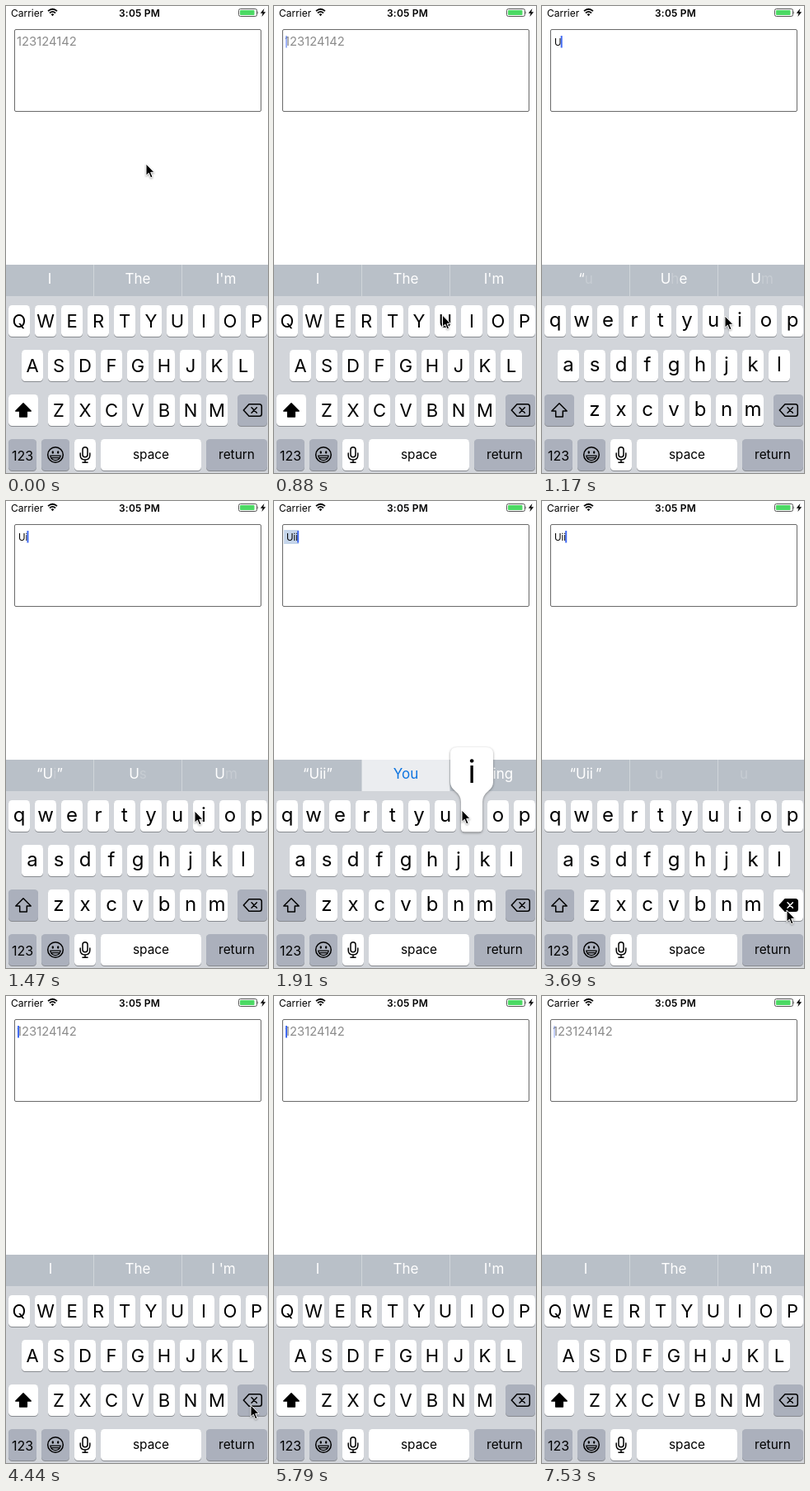
An HTML page that plays this animation: 318 px wide and 565 px high, repeating every 7630 ms.

```html
<!DOCTYPE html>
<html lang="en">
<head>
<meta charset="utf-8">
<title>Text view with keyboard</title>
<style>
  html, body { margin: 0; width: 100%; height: 100%; overflow: hidden; background: #fff; }
  svg { display: block; width: 318px; height: 565px; font-family: Inter, Roboto, "Liberation Sans", sans-serif; }
  text { white-space: pre; }
  .mid { text-anchor: middle; }
  .line { fill: none; stroke: #000; stroke-width: 1.5; stroke-linecap: round; stroke-linejoin: round; }
</style>
</head>
<body>
<svg id="stage" viewBox="0 0 318 565" xmlns="http://www.w3.org/2000/svg"></svg>
<script>
const LOOP = 7630;
const GRAY = '#abb0bc';
const stage = document.getElementById('stage');

// Picture steps: about 147 ms apart at first, then 150 ms
const late = { 48: 7130, 49: 7280, 50: 7430, 51: 7530 };
const times = Array.from({ length: 52 }, (_, i) =>
  late[i] || (i <= 17 ? Math.floor(i * 14.7) * 10 : 2490 + 150 * (i - 17)));

// [step, typed letters, pressed key, three suggestions]; {x} is faint, * is chosen, @ sets the centre
const typing = [
  [0, 0, '', 'I', 'The', "I'm"],
  [7, 0, 'U', 'I', 'The', "I'm"],
  [8, 1, '', '“{u}', 'U{h}e', 'U{m}'],
  [9, 1, 'i', '“U”', 'Use', 'Um'],
  [10, 2, '', '“U{i}”', 'U{s}', 'U{m}'],
  [11, 2, 'i', '“Ui”', 'Us', 'Using'],
  [12, 3, '', '“Ui{i}”', '*You', 'Using'],
  [13, 3, 'i', '“Uii”', '*You', 'Using'],
  [14, 4, '', '“Uii”', '{You}', '{Using}'],
  [15, 4, 'i', '“Uiii”', '', ''],
  [16, 5, 'i', '“Uiii”', '', ''],
  [17, 6, '', '“Uiii”', '', ''],
  [18, 6, '', '“Uiii{ii}”', '', ''],
  [19, 6, '', '“Uiiiii”', '', ''],
  [21, 5, 'del', '“Uiiiii”', '', ''],
  [22, 4, 'del', '“Uiiii”', '', ''],
  [23, 3, 'del', '“Uiii”', '', ''],
  [24, 3, '', '“Uii{i}”', '', ''],
  [25, 3, 'del', '“Uii\u2009”', '{u}@142', '{u}@245'],
  [26, 2, 'del', '“Uii”', 'You', 'Using'],
  [27, 2, '', '“Ui”', 'Us', 'Using'],
  [28, 1, 'del', '“U{i}”', 'U{s}', 'U{m}'],
  [29, 0, 'del', '{“}I', '{U}he', "{I'}m"],
  [30, 0, '', 'I@54', 'The', "I 'm@264"],
  [31, 0, '', 'I@54', 'The', "I\u2009'm@266"],
  [32, 0, '', 'I', 'The', "I'm"],
];

// [step, x, y] of the pointer tip
const pointer = [
  [0, 170, 191], [5, 203, 372], [7, 206, 376], [8, 222, 375], [10, 229, 375], [13, 228, 374],
  [16, 234, 380], [17, 242, 392], [20, 296, 497], [21, 297, 495], [33, 297, 495], [39, 293, 570], [51, 293, 570],
];

// [step, caret opacity]
const blink = [
  [0, 0], [2, .5], [3, 1], [6, .5], [7, 0], [8, 1], [34, .5], [35, 0], [37, .4], [38, 1],
  [41, .5], [42, 0], [44, .4], [45, 1], [48, .5], [49, 0], [51, .3],
];

const label = (s, x, y, size, extra = '') =>
  `<text class="mid" x="${x}" y="${y}" font-size="${size}" ${extra}>${s}</text>`;

const key = (x, y, w, fill = '#fff', id = '') =>
  `<rect x="${x}" y="${y + 1}" width="${w}" height="38" rx="4.5" fill="#888b90"/>` +
  `<rect id="${id || 'k' + x + y}" x="${x}" y="${y}" width="${w}" height="38" rx="4.5" fill="${fill}"/>`;

const rows = [['QWERTYUIOP', 3, 362], ['ASDFGHJKL', 19, 416], ['ZXCVBNM', 51, 470]];

function eachLetter(draw) {
  return rows.map(([letters, x, y]) =>
    [...letters].map((c, i) => draw(c, x + 32 * i, y)).join('')).join('');
}

const statusBar = `
  <text x="6" y="12.5" font-size="12">Carrier</text>
  <g fill="none" stroke="#000" stroke-width="1.7">
    <path d="M51 6.2Q56.5 1.3 62 6.2M53 8.5Q56.5 5.3 60 8.5"/>
  </g>
  <path d="M54.6 10.1Q56.5 8.5 58.4 10.1L56.5 12.2Z"/>
  ${label('3:05 PM', 162, 12.5, 12, 'font-weight="600" letter-spacing=".2"')}
  <rect x="282.5" y="3.5" width="22" height="9" rx="2" fill="#fff" stroke="#555"/>
  <rect x="284" y="5" width="17.5" height="6" rx=".8" fill="#4cd964"/>
  <path d="M305.5 6.3q1.6 1.7 0 3.4z" fill="#555"/>
  <path d="M313.4 3L308.8 8.7H311.6L310.4 13L315.2 7.2H312.3Z"/>`;

const field = `
  <rect x="10.5" y="28.5" width="299" height="99" rx="1.5" fill="#fff" stroke="#6a6a6a"/>
  <rect id="mark" x="12" y="35" width="18" height="17" fill="#c5d5ea"/>
  <text id="hint" x="13" y="48" font-size="14.8" fill="#8c8c8c">123124142</text>
  <text id="word" x="15" y="47.5" font-size="11.5"></text>
  <rect id="caret" y="36" width="2" height="14.5" fill="#426bf2"/>`;

const bar = `
  <rect y="313" width="318" height="252" fill="#d2d5da"/>
  <rect y="313" width="318" height="38" fill="#b9c0c8"/>
  <rect id="chosen" x="106" y="313" width="108" height="38" fill="#ebedf0"/>
  <path d="M106.5 313V351M213.5 313V351" stroke="#d0d5da"/>
  ${[0, 1, 2].map(i => label('', 0, 336, 17, `id="tip${i}"`)).join('')}`;

const keyboard = `
  ${eachLetter((c, x, y) => key(x, y, 26))}
  <g id="upper">${eachLetter((c, x, y) => label(c, x + 13, y + 27, 22))}</g>
  <g id="lower">${eachLetter((c, x, y) => label(c.toLowerCase(), x + 13, y + 26, 24))}</g>
  ${key(3, 470, 36, '#fff', 'shift')}
  <path id="arrow" class="line" d="M21 480.8L30.2 490H25.3V497H16.7V490H11.8Z"/>
  ${key(281, 470, 36, GRAY, 'del')}
  <path id="delBox" class="line" d="M288.3 489L295 481.7H307.5Q310.3 481.7 310.3 484.5V493.5Q310.3 496.3 307.5 496.3H295Z"/>
  <path id="delX" class="line" d="M298 485.8L304.4 492.2M304.4 485.8L298 492.2"/>
  ${key(3, 524, 34, GRAY)}${label('123', 20, 549.5, 16)}
  ${key(43, 524, 34, GRAY)}
  <circle class="line" cx="60" cy="543" r="9.3"/>
  <ellipse cx="56.8" cy="540" rx="1.2" ry="1.7"/><ellipse cx="63.2" cy="540" rx="1.2" ry="1.7"/>
  <path class="line" style="stroke-width:1.2" d="M53.7 544.2H66.3Q65 549.7 60 549.7T53.7 544.2ZM55 546.6H65"/>
  ${key(83, 524, 26)}
  <rect class="line" x="93" y="533.8" width="6" height="12" rx="3"/>
  <path class="line" d="M90.2 541V543.5Q90.2 549 96 549T101.8 543.5V541M96 549V552.2M93 552.3H99"/>
  ${key(115, 524, 122)}${label('space', 176, 548, 15.4)}
  ${key(243, 524, 74, GRAY)}${label('return', 280, 548, 15.4)}`;

const popup = `
  <g id="popup" style="filter:drop-shadow(0 1px 1.5px rgba(0,0,0,.4))">
    <path fill="#fff" d="M-18 298H18Q26 298 26 306V340Q26 346 20.5 350.5Q13 356.5 13 364V396Q13 400.5 8.5 400.5H-8.5Q-13 400.5 -13 396V364Q-13 356.5 -20.5 350.5Q-26 346 -26 340V306Q-26 298 -18 298Z"/>
    ${label('', 0, 341, 38, 'id="big"')}
  </g>`;

const arrow = `
  <path id="mouse" d="M0 0V14.2L3.3 11.2L5.6 16.8L8 15.8L5.7 10.3H10Z" stroke="#fff" stroke-width="1"
    style="filter:drop-shadow(0 1px 1px rgba(0,0,0,.35))"/>`;

stage.innerHTML = statusBar + field + bar + keyboard + popup + arrow;

const el = id => document.getElementById(id);
const show = (id, on) => el(id).setAttribute('visibility', on ? 'visible' : 'hidden');
const latest = (table, step) => table.filter(row => row[0] <= step).pop();

function pointerAt(step) {
  const a = latest(pointer, step);
  const b = pointer[pointer.indexOf(a) + 1] || a;
  const f = a === b ? 0 : (step - a[0]) / (b[0] - a[0]);
  return [a[1] + (b[1] - a[1]) * f, a[2] + (b[2] - a[2]) * f];
}

function suggest(i, raw) {
  const chosen = raw[0] === '*';
  const [s, x] = raw.replace('*', '').split('@');
  const tip = el('tip' + i);
  tip.setAttribute('x', x || [53, 160, 267][i]);
  tip.setAttribute('fill', chosen ? '#0d74e0' : '#fff');
  tip.innerHTML = s.replace(/\{(.+?)\}/g, '<tspan fill-opacity=".2">$1</tspan>');
}

function draw(step) {
  const [, count, press, ...tips] = latest(typing, step);
  const caps = count === 0;
  const chosen = tips[1][0] === '*';

  el('word').textContent = 'Uiiiii'.slice(0, count);
  show('hint', caps);
  show('mark', chosen);
  show('chosen', chosen);
  el('caret').setAttribute('x', caps ? 14 : 22.7 + 2.75 * (count - 1));
  el('caret').setAttribute('opacity', latest(blink, step)[1]);
  tips.forEach((s, i) => suggest(i, s));

  show('upper', caps);
  show('lower', !caps);
  el('shift').setAttribute('fill', caps ? '#fff' : GRAY);
  el('arrow').style.fill = caps ? '#000' : 'none';

  const erasing = press === 'del';
  el('del').setAttribute('fill', erasing ? '#fff' : GRAY);
  el('delBox').style.fill = erasing ? '#000' : 'none';
  el('delX').style.stroke = erasing ? '#fff' : '#000';

  const letter = erasing ? '' : press;
  show('popup', letter);
  el('big').textContent = letter;
  el('popup').setAttribute('transform', `translate(${letter === 'U' ? 208 : 240} 0)`);

  el('mouse').setAttribute('transform', `translate(${pointerAt(step)})`);
}

let shown = -1;
const start = performance.now();
function tick() {
  const t = Math.max(0, performance.now() - start) % LOOP;
  const step = times.filter(x => x <= t).length - 1;
  if (step !== shown) draw(shown = step);
  requestAnimationFrame(tick);
}
tick();
</script>
</body>
</html>
```
